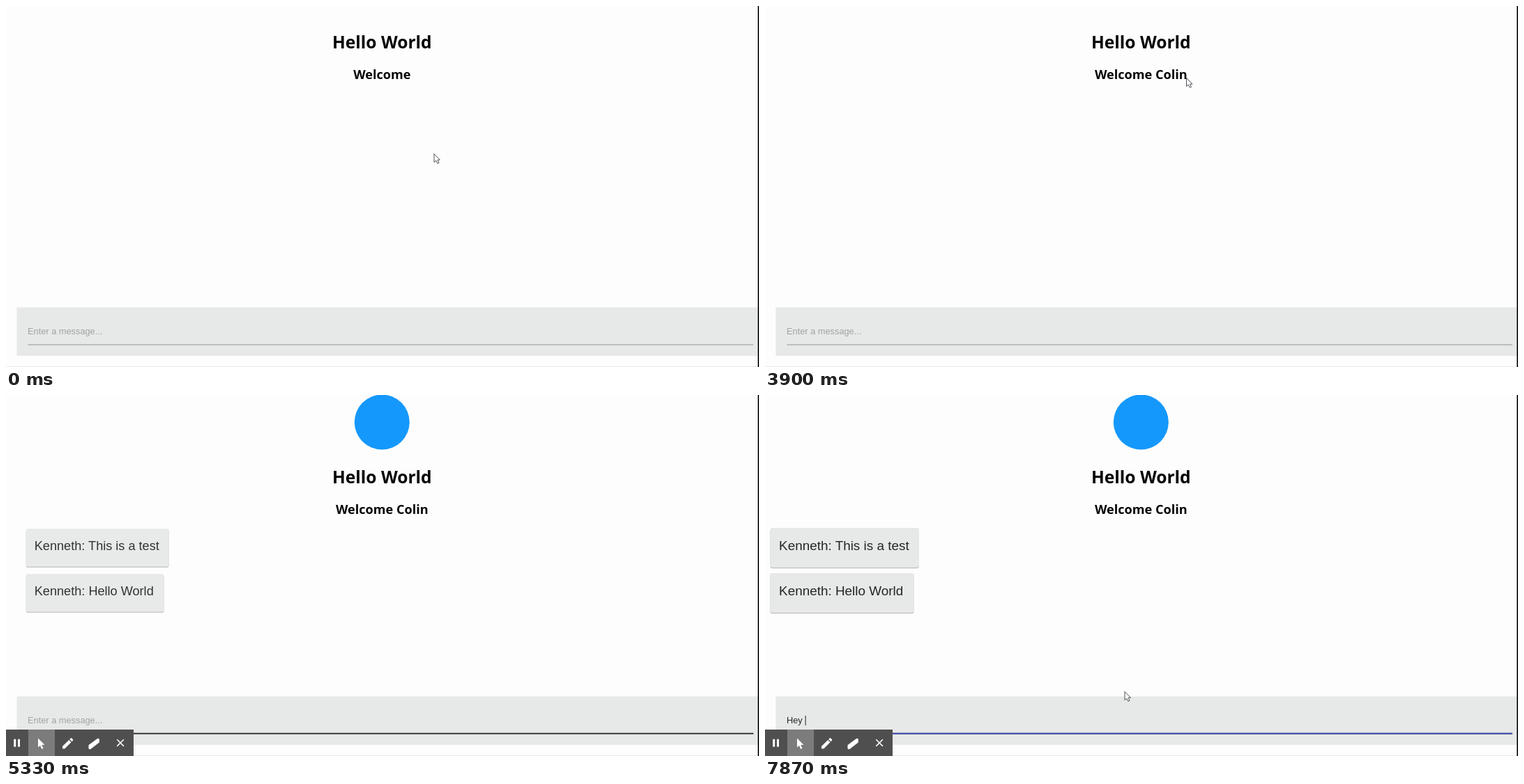
An HTML page for the animation above (8000 ms loop, 1080 by 519 pixels).

```html
<!DOCTYPE html>
<html lang="en">
<head>
<meta charset="utf-8">
<title>Chat demo</title>
<style>
  html, body { margin: 0; width: 100%; height: 100%; overflow: hidden; background: #fdfdfd; }
  svg { display: block; width: 100vw; height: 100vh; }
  text { white-space: pre; }
  .head { font-family: "Open Sans", "Noto Sans", sans-serif; font-weight: 700; text-anchor: middle; fill: #050505; }
  .ui { font-family: "Liberation Sans", Arial, sans-serif; }
</style>
</head>
<body>
<svg viewBox="0 0 1080 519" xmlns="http://www.w3.org/2000/svg">
  <rect width="1080" height="519" fill="#fdfdfd"/>
  <rect y="518" width="1080" height="1" fill="#e9e9e9"/>

  <circle id="logo" cx="539.3" cy="39" r="39.5" fill="#1598fb"/>
  <g id="heading">
    <text class="head" x="539.3" y="61" font-size="24.6">Hello World</text>
    <text class="head" id="welcome" x="539.3" y="105" font-size="18.1"></text>
  </g>
  <g id="cards"></g>

  <rect x="15.5" y="433.3" width="1063" height="69.7" fill="#e7e8e8"/>
  <text id="hint" class="ui" x="31" y="472.3" font-size="12.8" fill="#a2a2a2">Enter a message...</text>
  <text id="typed" class="ui" x="31" y="472.3" font-size="12.8" fill="#262626"></text>
  <rect id="caret" y="461" width="1" height="14" fill="#222"/>
  <rect id="line" x="31.5" width="1040.5"/>
  <rect id="focus" y="485.8" height="1.8" fill="#4150bd"/>

  <g id="tools" fill="#fff">
    <rect y="481" width="183" height="38" fill="#4f4f4f"/>
    <rect x="32" y="481" width="38" height="38" fill="#7c7c7c"/>
    <path d="M11.2 494.7h3v11h-3zM17 494.7h3v11h-3z"/>
    <path d="M46 493.5v13l3-2.6 2.3 5 2.2-1-2.3-4.8h4.2z"/>
    <path d="M81 508.5v-3.4l9.2-9.2 3.3 3.3-9.2 9.3zM91.2 494.9l1.5-1.5q.8-.6 1.6 0l1.6 1.7q.7.8 0 1.6l-1.5 1.5z"/>
    <path d="M118.5 503.2L131 494q2.5-1 2.8.8v4.7L121.5 509q-2.7 1-3-1z"/>
    <path d="M159.3 495.3l9.6 9.6m0-9.6l-9.6 9.6" fill="none" stroke="#fff" stroke-width="1.5"/>
  </g>

  <circle id="ring" cx="308.5" cy="466" fill="none" stroke="#ea5a66" stroke-width="3"/>
  <path id="pointer" d="M.5 .5v12.2l2.8-2.6 2 4.2 2.2-1-2-4.1h3.4z" fill="#fff" stroke="#3d3d45" stroke-width=".9"/>
  <rect x="1078.3" width="1.7" height="519" fill="#101014"/>
</svg>
<script>
const LOOP = 8000;
const $ = id => document.getElementById(id);
const clamp = v => Math.min(1, Math.max(0, v));
const span = (t, start, length) => clamp((t - start) / length);
const smooth = p => p * p * (3 - 2 * p);
const easeOut = p => 1 - (1 - p) ** 3;
const set = (el, attrs) => { for (const k in attrs) el.setAttribute(k, attrs[k]); };
const show = (el, on) => el.setAttribute("visibility", on ? "visible" : "hidden");

const messages = [
  { top: 191, width: 213.5, text: "Kenneth: This is a test" },
  { top: 256, width: 206, text: "Kenneth: Hello World" }
];
$("cards").innerHTML = messages.map(m => `<g>
  <rect x="7.5" y="${m.top + 1.3}" width="${m.width}" height="57" rx="3.2" fill="#bfbfbf"/>
  <rect x="7.5" y="${m.top}" width="${m.width}" height="57" rx="3.2" fill="#e7e8e8"/>
  <text class="ui" x="20.1" y="${m.top + 31.7}" font-size="18.9" fill="#252525">${m.text}</text>
</g>`).join("");
const cards = [...$("cards").children];

// Each run is a visible stretch of pointer travel: [time, x, y]
const runs = [
  [[0, 613.5, 212], [30, 613.5, 212], [330, 607, 213], [2270, 607, 213]],
  [[3230, 594, 198], [3350, 594, 140], [3470, 594, 162], [3900, 594, 162]],
  [[3900, 604, 103], [3930, 604, 103], [4300, 609, -16]],
  [[4470, 560, -10], [4900, 307, 489], [4970, 307, 489]],
  [[6330, 470, 458], [6470, 515.5, 426], [LOOP, 515.5, 426]]
];

function pointerAt(t) {
  const run = runs.find(r => t >= r[0][0] && t < r[r.length - 1][0]);
  if (!run) return null;
  const i = run.findIndex(k => k[0] > t);
  const [a, b] = [run[i - 1], run[i]];
  const p = smooth(span(t, a[0], b[0] - a[0]));
  return [a[1] + (b[1] - a[1]) * p, a[2] + (b[2] - a[2]) * p];
}

const keyTimes = [7450, 7630, 7730, 7850];
const FOCUS = 5865;

function drawCards(t) {
  const p = smooth(span(t, 5036, 350));
  const s = 0.4 + 0.6 * p;
  cards.forEach((card, i) => {
    const cy = messages[i].top + 28.5;
    set(card, { opacity: p, transform: `translate(540 ${cy}) scale(${s}) translate(-540 ${-cy})` });
  });
}

function drawField(t) {
  const count = keyTimes.filter(k => t >= k).length;
  const typed = "Hey ".slice(0, count);
  $("typed").textContent = typed;
  show($("hint"), !count);

  const blinkStart = count ? keyTimes[count - 1] : FOCUS;
  show($("caret"), t >= FOCUS && Math.floor((t - blinkStart) / 530) % 2 === 0);
  set($("caret"), { x: 31.3 + (count ? $("typed").getComputedTextLength() : 0) });

  const shade = Math.round(148 - 110 * span(t, 4850, 100));
  const thick = t >= 4970;
  set($("line"), {
    y: thick ? 485.8 : 486.5,
    height: thick ? 1.8 : 1,
    fill: `rgb(${shade},${shade},${shade})`
  });

  const half = 520.25 * easeOut(span(t, FOCUS, 200));
  set($("focus"), { x: 551.75 - half, width: 2 * half });
}

function drawRing(t) {
  const p = span(t, 5830, 250);
  show($("ring"), p > 0 && p < 1);
  set($("ring"), { r: 14 + 22 * Math.sqrt(p), opacity: 1 - 0.35 * p - 0.65 * p ** 3 });
}

function draw(t) {
  const loaded = t >= 4470;
  show($("logo"), loaded);
  set($("heading"), { transform: `translate(0 ${loaded ? 65.8 : 0})` });
  $("welcome").textContent = t >= 3900 ? "Welcome Colin" : "Welcome";
  show($("tools"), t >= 4670);
  drawCards(t);
  drawField(t);
  drawRing(t);
  const at = pointerAt(t);
  show($("pointer"), at);
  if (at) set($("pointer"), { transform: `translate(${at[0]} ${at[1]})` });
}

const begin = performance.now();
function tick() {
  draw((performance.now() - begin) % LOOP);
  requestAnimationFrame(tick);
}
tick();
</script>
</body>
</html>
```
